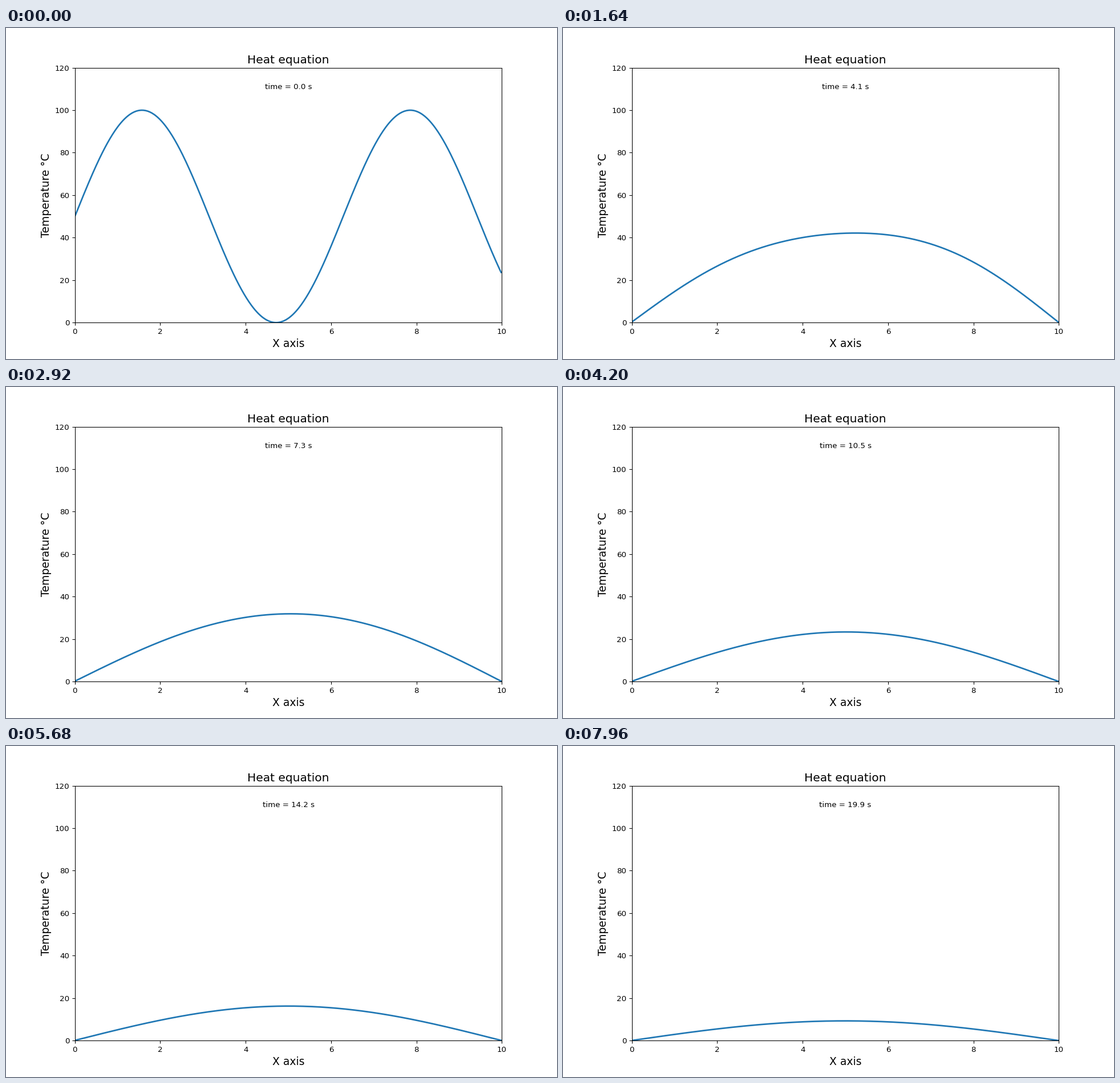
Animation, 966 px wide and 580 px high, one loop 8000 ms. Source, as a matplotlib script:

```python
import numpy as np
import matplotlib.pyplot as plt
from matplotlib.animation import FuncAnimation

WIDTH, HEIGHT, DPI = 966, 580, 96.6
FRAMES, INTERVAL = 200, 40
STEP = 0.1                  # simulated seconds per frame
LENGTH, DX = 10.0, 0.02

plt.rcParams["font.family"] = "DejaVu Sans"

# Heat flow on a grid, held at zero one cell beyond either end, in sine modes.
count = round(LENGTH / DX)
x = DX * np.arange(count)
k = np.arange(1, count + 1)
modes = np.sin(np.pi * np.outer(k, k) / (count + 1))
rates = (2 / DX * np.sin(np.pi * k / (2 * (count + 1)))) ** 2
weights = 2 / (count + 1) * modes @ (50 + 50 * np.sin(x))


def temperature(t):
    return modes @ (weights * np.exp(-rates * t))


# The small margin keeps the pixel size from rounding down.
fig, ax = plt.subplots(figsize=((WIDTH + 0.01) / DPI, (HEIGHT + 0.01) / DPI),
                       dpi=DPI)
ax.set_xlim(0, LENGTH)
ax.set_ylim(0, 120)
ax.set_title("Heat equation", fontsize=15)
ax.set_xlabel("X axis", fontsize=14)
ax.set_ylabel("Temperature °C", fontsize=14)

line, = ax.plot(x, temperature(0), color="#1f77b4", lw=2)
clock = ax.text(LENGTH / 2, 110, "", ha="center", fontsize=10)


def update(i):
    t = i * STEP
    line.set_ydata(temperature(t))
    clock.set_text(f"time = {t:.1f} s")
    return line, clock


anim = FuncAnimation(fig, update, frames=FRAMES, interval=INTERVAL,
                     repeat=True, repeat_delay=0)
plt.show()
```
